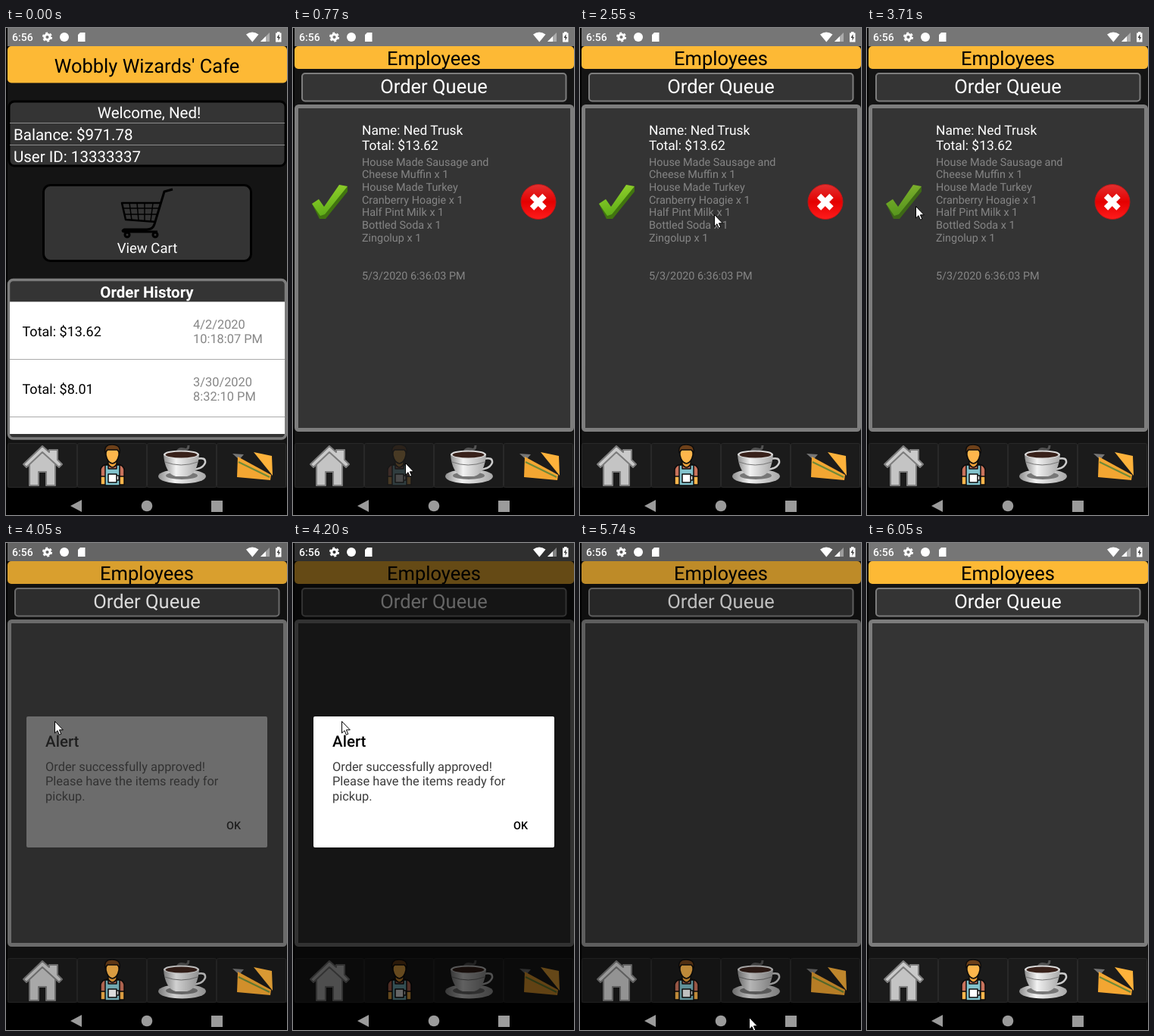
An HTML page that plays this animation: 371x643 px, repeating every 6200 ms.

```html
<!DOCTYPE html>
<html lang="en">
<head>
<meta charset="utf-8">
<title>Cafe order queue</title>
<style>
  html, body { margin: 0; width: 100%; height: 100%; overflow: hidden; background: #000; }
  svg { display: block; width: 371px; height: 643px; font-family: Roboto, sans-serif; text-rendering: geometricPrecision; }
  .mid { text-anchor: middle; }
  .h { font-size: 25.5px; }
  .m { font-size: 20.5px; }
  .row { font-size: 18px; }
  .name { font-size: 17.4px; }
  .body, .date { font-size: 16.4px; }
  .item { font-size: 14.4px; fill: #858585; }
  .date { fill: #868686; }
  .w { fill: #fff; }
  .panel { fill: #343434; }
  .cell { fill: #1b1b1b; stroke: #292929; }
  .bold { font-weight: 700; }
  .med { font-weight: 500; }
</style>
</head>
<body>
<svg viewBox="0 0 371 643">
  <defs>
    <linearGradient id="green" x1="0" y1="0" x2=".3" y2="1">
      <stop offset="0" stop-color="#9ad62f"/><stop offset="1" stop-color="#5fae18"/>
    </linearGradient>
    <linearGradient id="red" x1="0" y1="0" x2="0" y2="1">
      <stop offset="0" stop-color="#e23030"/><stop offset=".5" stop-color="#e40000"/><stop offset="1" stop-color="#ff1c1c"/>
    </linearGradient>
    <linearGradient id="china" x1="0" x2="1">
      <stop offset="0" stop-color="#8f8f8f"/><stop offset=".35" stop-color="#f2f2f2"/><stop offset="1" stop-color="#a8a8a8"/>
    </linearGradient>
  </defs>

  <rect x="2" width="369" height="607" fill="#141414"/>
  <rect x="2" width="369" height="24" fill="#767676"/>

  <g id="home">
    <rect x="2" y="24" width="369" height="48.500" rx="5" fill="#fdb935"/>
    <text class="h mid" x="186" y="59">Wobbly Wizards' Cafe</text>

    <rect class="panel" x="4" y="97" width="365" height="85" rx="7" stroke="#000" stroke-width="3"/>
    <path d="M5 125.500H368M5 154.500H368" stroke="#8c8c8c"/>
    <g class="m w">
      <text class="mid" x="189" y="119">Welcome, Ned!</text>
      <text x="10" y="148">Balance: $971.78</text>
      <text x="10" y="177">User ID: 13333337</text>
    </g>

    <rect class="panel" x="49.500" y="207.500" width="274" height="100" rx="9" stroke="#000" stroke-width="3"/>
    <g fill="none" stroke="#000" stroke-width="3" stroke-linejoin="round">
      <path d="M220 213L209 216L196 259Q194 266 186 266H156Q152 268 156 269H200"/>
      <path d="M205 231H153L158 253L198 256" stroke-width="2.500"/>
      <path d="M154 238H202M156 246H200M163 231L166 254M173 231L175 254M183 231V255M194 231L191 255" stroke-width="1.500"/>
      <circle cx="160" cy="273" r="3"/>
      <circle cx="197" cy="273" r="3"/>
    </g>
    <text class="w mid" x="186.500" y="297" font-size="18.500">View Cart</text>

    <rect class="panel" x="3.500" y="332.500" width="366" height="209.500" rx="6" stroke="#7c7c7c" stroke-width="3.500"/>
    <text class="m w mid bold" x="186" y="356">Order History</text>
    <path d="M5 362H368V536H5Z" class="w"/>
    <g id="history"></g>
  </g>

  <g id="staff">
    <rect x="2" y="24" width="369" height="30" rx="5" fill="#fdb935"/>
    <text class="h mid" x="186" y="49">Employees</text>
    <rect class="panel" x="12" y="60" width="348.500" height="36.500" rx="4" stroke="#7d7d7d" stroke-width="2"/>
    <text class="h w mid" x="186" y="86">Order Queue</text>
    <rect class="panel" x="4.500" y="103.500" width="364" height="427" rx="3" stroke="#7d7d7d" stroke-width="5"/>
    <g id="order">
      <text class="name w" x="91" y="141">Name: Ned Trusk</text>
      <text class="name w" x="91" y="161">Total: $13.62</text>
      <g id="items"></g>
      <g id="check">
        <path d="M25 232L35 252L43 252L72 216V209L40 238Z" fill="#41750f"/>
        <path d="M25 232L34 226L41 236L61 207L72 209L42 246L36 248Z" fill="url(#green)"/>
      </g>
      <circle cx="324" cy="229.500" r="23" fill="url(#red)" stroke="#b81818"/>
      <path d="M315.500 221.500L332 238M332 221.500L315.500 238" stroke="#fff" stroke-width="7.500"/>
    </g>
  </g>

  <g id="cells"></g>
  <g stroke="#7d7d7d" stroke-width="2" stroke-linejoin="round">
    <path d="M31 574L48 559L65 574V604H53V586H43V604H31Z" fill="#c4c4c4"/>
    <path d="M48 552L57 560V557H68V570L74 576L70 580L48 560L27 580L23 576Z" fill="#cacaca"/>
  </g>

  <g id="staffTab" stroke="#0c0c0c" stroke-width="1.500" stroke-linejoin="round">
    <path d="M125 603V584Q125 577 134 576H147Q156 577 156 584V603H149V590H132V603Z" fill="#fdb64c"/>
    <path d="M125 592V583Q126 577 134 576H147Q155 577 156 583V592Z" fill="#c9735c"/>
    <path d="M131 604V577H135V582H146V577H150V604Z" fill="#83c3cd"/>
    <path d="M135 570H146V576Q140.500 584 135 576Z" fill="#e99d38"/>
    <path d="M132 556H149V564Q147 574 140.500 575Q134 574 132 564Z" fill="#fdb64c"/>
    <path d="M131 561Q129 550 140 550Q152 550 150 561L147 557H134Z" fill="#6d4019"/>
    <path d="M135 589H146V600H135ZM146 591H149V597H146" fill="#fff"/>
  </g>

  <path d="M226 559Q229 554 235 556T241 551" fill="none" stroke="#999" stroke-width="3" opacity=".45"/>
  <ellipse cx="232.500" cy="592" rx="31.500" ry="9.500" fill="url(#china)"/>
  <ellipse cx="232" cy="591" rx="21" ry="5" fill="#777"/>
  <path d="M252 569Q264 566 263 574Q260 582 247 583" fill="none" stroke="#ccc" stroke-width="2.500"/>
  <path d="M208 563C209 579 215 590 224 592H239C249 590 254 578 255 563Z" fill="url(#china)"/>
  <path d="M210 573Q231 581 253 573" fill="none" stroke="#777"/>
  <ellipse cx="231.500" cy="563" rx="23.500" ry="5.500" fill="#ddd"/>
  <ellipse cx="231.500" cy="563.500" rx="21" ry="4" fill="#38211a"/>

  <path d="M299 562L314 563L308 570Z" fill="#777"/>
  <path d="M327 560L351 565L352 591Z" fill="#fdb23b"/>
  <path d="M306 566L350 590L349 597L305 593Z" fill="#f3a632"/>
  <path d="M307 573L348 593" stroke="#6f8a38" stroke-width="2"/>

  <rect id="dim" x="2" width="369" height="607"/>

  <g class="w">
    <text class="med" x="8" y="17" font-size="14">6:56</text>
    <g fill="none" stroke="#fff">
      <circle cx="54.500" cy="12" r="3.600" stroke-width="3"/>
      <circle cx="54.500" cy="12" r="5.600" stroke-width="2" stroke-dasharray="2.930"/>
    </g>
    <circle cx="77" cy="12" r="6"/>
    <path d="M98 6H104.500V18H95V9Z"/>
    <path d="M317 8.500Q325 2.500 333.500 8.500L325.300 18.500Z"/>
    <path d="M348 6V18H336Z" opacity=".4"/><path d="M343 11V18H336Z"/>
    <path d="M358 5H361.500V6.500H363.500V18.500H356V6.500H358Z"/>
    <path d="M360.500 8L357.500 13H359.500V17L362 12H360.500Z" fill="#444"/>
  </g>
  <g fill="#9b9b9b">
    <path d="M100 623V639L85 631Z"/>
    <circle cx="186" cy="631" r="7.300"/>
    <rect x="271" y="624" width="15" height="15"/>
  </g>

  <g id="dialog">
    <rect class="w" x="27" y="229" width="318" height="173" rx="2"/>
    <text class="m med" x="52" y="269">Alert</text>
    <g class="body" fill="#3c3c3c">
      <text x="52" y="301">Order successfully approved!</text>
      <text x="52" y="320">Please have the items ready for</text>
      <text x="52" y="340">pickup.</text>
    </g>
    <text class="med" x="291" y="378" font-size="14.400">OK</text>
  </g>

  <path id="cursor" d="M.5 .5V16L4 12.700L6.400 18.200L8.800 17.200L6.400 11.800H11.300Z" fill="#fff" stroke="#000"/>
</svg>
<script>
  const LOOP = 6200, STEP = 77.5;
  const $ = id => document.getElementById(id);
  const fill = (id, list, draw) => $(id).innerHTML = list.map(draw).join('');
  const text = (cls, x, y, s) => `<text class="${cls}" x="${x}" y="${Math.round(y)}">${s}</text>`;

  fill('cells', [0, 1, 2, 3], i =>
    `<rect class="cell" x="${2.5 + i * 92}" y="548.5" width="91" height="58" rx="2"/>`);

  fill('history', [['$13.62', '4/2/2020', '10:18:07 PM'], ['$8.01', '3/30/2020', '8:32:10 PM']],
    ([total, day, hour], i) => {
      const y = 361.5 + i * 76;
      return `<path d="M5 ${y}H368M5 ${y + 76}H368" stroke="#aaa"/>` +
        text('row', 21.5, y + 45, 'Total: ' + total) +
        text('date', 247, y + 35, day) + text('date', 247, y + 54, hour);
    });

  fill('items', ['House Made Sausage and', 'Cheese Muffin x 1', 'House Made Turkey',
    'Cranberry Hoagie x 1', 'Half Pint Milk x 1', 'Bottled Soda x 1', 'Zingolup x 1',
    '', '', '5/3/2020 6:36:03 PM'], (s, i) => text('item', 91, 181.5 + i * 16.7, s));

  // Places the pointer passes: time, x, y.
  const stops = [
    [0, 232, 660], [540, 148, 574], [775, 148, 574], [1385, 117, 294], [1760, 13, 211],
    [2310, 84, 300], [2552, 177, 246], [2785, 110, 142], [3100, 25, 200], [3480, 64, 235],
    [4200, 64, 235], [4870, 292, 370], [5342, 271, 407], [5575, 240, 563], [5900, 212, 660]
  ];

  // Monotone cubic through the stops: slows down at every turn, never overshoots.
  function pointer(t, axis) {
    const rate = i => stops[i] && stops[i + 1]
      ? (stops[i + 1][axis] - stops[i][axis]) / (stops[i + 1][0] - stops[i][0]) : 0;
    const slope = i => {
      const a = rate(i - 1), b = rate(i);
      return a * b > 0 ? 2 * a * b / (a + b) : 0;
    };
    const next = stops.findIndex(s => s[0] > t);
    if (next < 1) return stops[next ? stops.length - 1 : 0][axis];
    const i = next - 1, span = stops[next][0] - stops[i][0], u = (t - stops[i][0]) / span;
    const ease = u * u * (3 - 2 * u);
    return stops[i][axis] * (1 - ease) + stops[next][axis] * ease
      + span * u * (1 - u) * (slope(i) * (1 - u) - slope(next) * u);
  }

  const ramp = (t, from, length) => Math.min(1, Math.max(0, (t - from) / length));
  const pulse = (t, on, off, length) => ramp(t, on, length) - ramp(t, off, length);
  const show = (id, on) => $(id).style.display = on ? '' : 'none';
  const fade = (id, value) => $(id).setAttribute('opacity', value);

  function draw(now) {
    // Each picture is held for one step.
    const t = Math.floor((now % LOOP + 12) / STEP) * STEP - 5;
    show('home', t < 765);
    show('staff', t >= 765);
    show('order', t < 3990);
    fade('staffTab', 1 - .8 * pulse(t, 490, 850, 200));
    fade('check', 1 - .8 * pulse(t, 3665, 3880, 200));
    fade('dim', .6 * pulse(t, 3980, 5620, 190));
    fade('dialog', pulse(t, 3980, 5380 + 45, 150));
    const x = Math.round(pointer(t, 1)), y = Math.round(pointer(t, 2));
    $('cursor').setAttribute('transform', `translate(${x} ${y})`);
  }

  const start = performance.now();
  function tick() {
    draw(performance.now() - start);
    requestAnimationFrame(tick);
  }
  tick();
</script>
</body>
</html>
```
